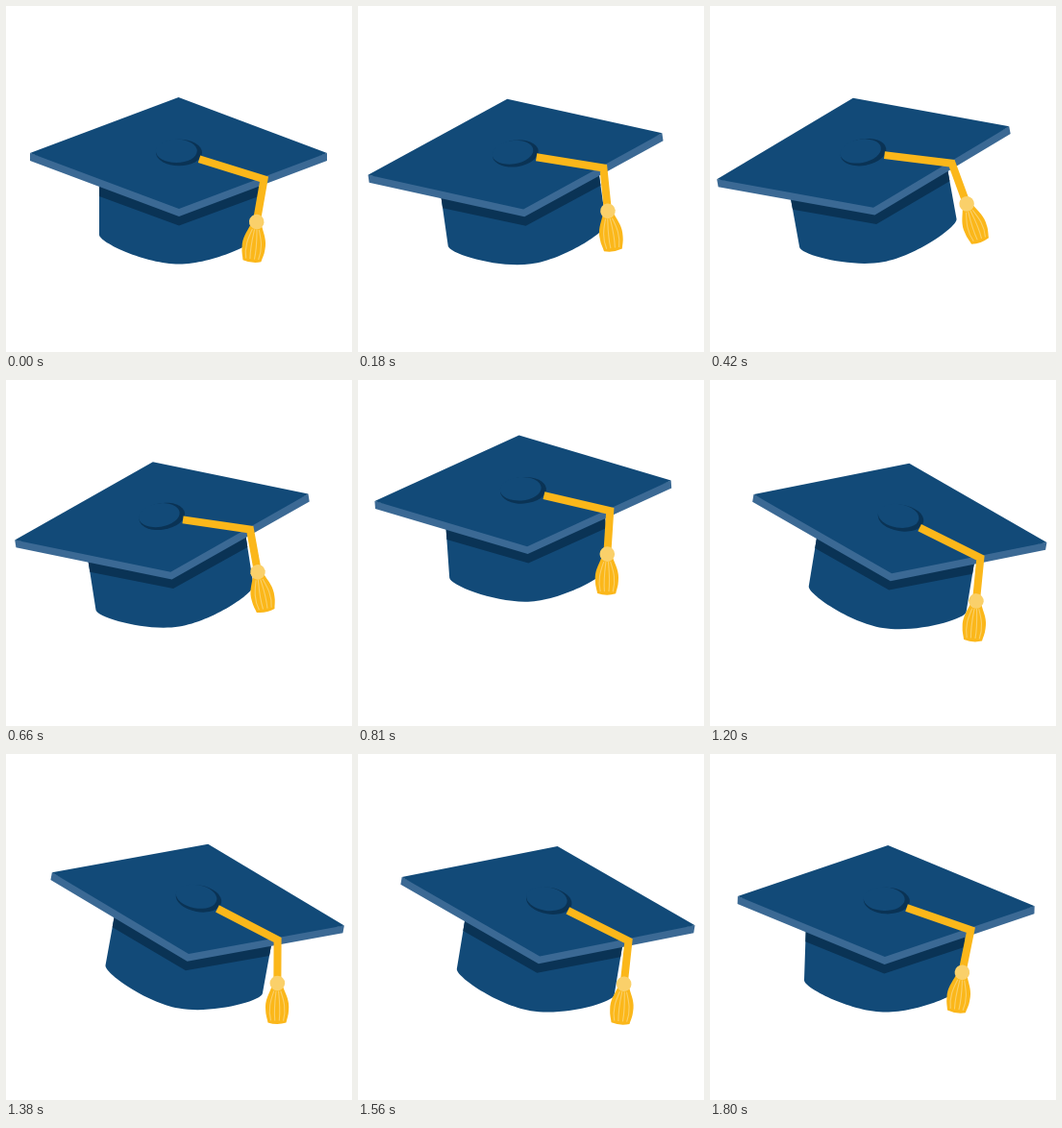
An HTML page with a canvas for the animation above (1.86 s loop, 360 by 360 pixels).

```html
<!DOCTYPE html>
<html lang="en">
<head>
<meta charset="utf-8">
<title>Graduation cap</title>
<style>
html, body { margin: 0; width: 100%; height: 100%; overflow: hidden; background: #fff; }
canvas { display: block; width: 360px; height: 360px; }
</style>
</head>
<body>
<canvas id="stage"></canvas>
<script>
const LOOP = 1860, HALF = LOOP / 2, STEP = 30, PIVOT = 267;
const NAVY = '#124a78', RIM = '#3b6994', DARK = '#0a3355';
const GOLD = '#fbb71a', PALE = '#fad06a';

const canvas = document.getElementById('stage');
const ctx = canvas.getContext('2d');
const dpr = window.devicePixelRatio || 1;
canvas.width = canvas.height = 360 * dpr;

// tilt in degrees over half a loop; the second half mirrors it
const TILT = [[0, 0], [30, -1.8], [150, -7.4], [180, -8.1], [270, -9.3], [450, -10.3],
  [570, -9.9], [645, -9.2], [690, -8.1], [870, -1.9], [930, 0]];
const LIFT = [[0, 0], [320, 0.3], [540, 6.5], [660, 12], [690, 15], [810, 38], [895, 43.5],
  [960, 41], [1080, 18], [1200, 10.5], [1310, 5.5], [1560, 1.3], [1740, 0], [1860, 0]];

// monotone cubic through the keys
function curve(keys, t) {
  const last = keys.length - 1;
  const rise = i => (keys[i + 1][1] - keys[i][1]) / (keys[i + 1][0] - keys[i][0]);
  const slope = i => {
    if (i === 0) return rise(0);
    if (i === last) return rise(last - 1);
    const a = rise(i - 1), b = rise(i);
    return a * b <= 0 ? 0 : 2 * a * b / (a + b);
  };
  let i = 0;
  while (i < last - 1 && t >= keys[i + 1][0]) i++;
  const [t0, v0] = keys[i], [t1, v1] = keys[i + 1];
  const d = t1 - t0, u = (t - t0) / d, w = 1 - u;
  return w * w * ((1 + 2 * u) * v0 + u * d * slope(i)) +
    u * u * ((3 - 2 * u) * v1 - w * d * slope(i + 1));
}

const rad = deg => deg * Math.PI / 180;

function fill(color, d) {
  ctx.fillStyle = color;
  ctx.fill(new Path2D(d));
}

function oval(color, x, y, rx, ry) {
  ctx.fillStyle = color;
  ctx.beginPath();
  ctx.ellipse(x, y, rx, ry, 0, 0, Math.PI * 2);
  ctx.fill();
}

function drawCap() {
  fill(NAVY, 'M97 180V238C97 246 145 268.5 180 268.5S263 246 263 238V180Z');
  fill(DARK, 'M97 182V198L180 228.5L263 198V182L180 212Z');
  fill(RIM, 'M25 153V161L180 219L334 161V153L180 200Z');
  fill(NAVY, 'M179.5 95L334 153L180 211L25 153Z');
  oval(DARK, 180, 152.5, 24, 13.8);
  oval(NAVY, 177.3, 150.8, 21.5, 12.2);
}

function drawTassel(swing, flare) {
  const tip = [268.5, 180.2], len = 45;
  const knob = [tip[0] - len * Math.sin(rad(swing)), tip[1] + len * Math.cos(rad(swing))];
  ctx.strokeStyle = GOLD;
  ctx.lineWidth = 8;
  ctx.lineJoin = 'miter';
  ctx.beginPath();
  ctx.moveTo(201, 159.3);
  ctx.lineTo(...tip);
  ctx.lineTo(...knob);
  ctx.stroke();

  ctx.save();
  ctx.translate(...knob);
  ctx.rotate(rad(swing + flare));
  fill(GOLD, 'M-6 4C-9 12 -13 18 -12 28C-12 33 -10 38 -9.5 41Q0 44 9.5 41C10 38 12 33 12 28C13 18 9 12 6 4Z');
  ctx.strokeStyle = PALE;
  ctx.lineWidth = 1.1;
  for (const k of [-1, -0.35, 0.35, 1]) {
    ctx.beginPath();
    ctx.moveTo(3.5 * k, 8);
    ctx.bezierCurveTo(6 * k, 16, 10 * k, 26, 6.5 * k, 39);
    ctx.stroke();
  }
  oval(PALE, 0, 0, 7.8, 7.8);
  ctx.restore();
}

function draw(ms) {
  let n = Math.floor((ms % LOOP) / STEP);
  if (n > 1 && n % 6 === 1) n--; // every sixth picture is held twice as long
  const t = n * STEP;
  const tilt = t < HALF ? curve(TILT, t) : -curve(TILT, t - HALF);
  const wave = Math.cos(2 * Math.PI * (t + 18) / HALF);

  ctx.setTransform(dpr, 0, 0, dpr, 0, 0);
  ctx.fillStyle = '#fff';
  ctx.fillRect(0, 0, 360, 360);
  ctx.translate(180, PIVOT - curve(LIFT, t));
  ctx.rotate(rad(tilt));
  ctx.translate(-180, -PIVOT);
  drawCap();
  drawTassel(10 * wave, -1.5 - 1.7 * wave);
}

const start = performance.now();
function tick() {
  draw(performance.now() - start);
  requestAnimationFrame(tick);
}
tick();
</script>
</body>
</html>
```
